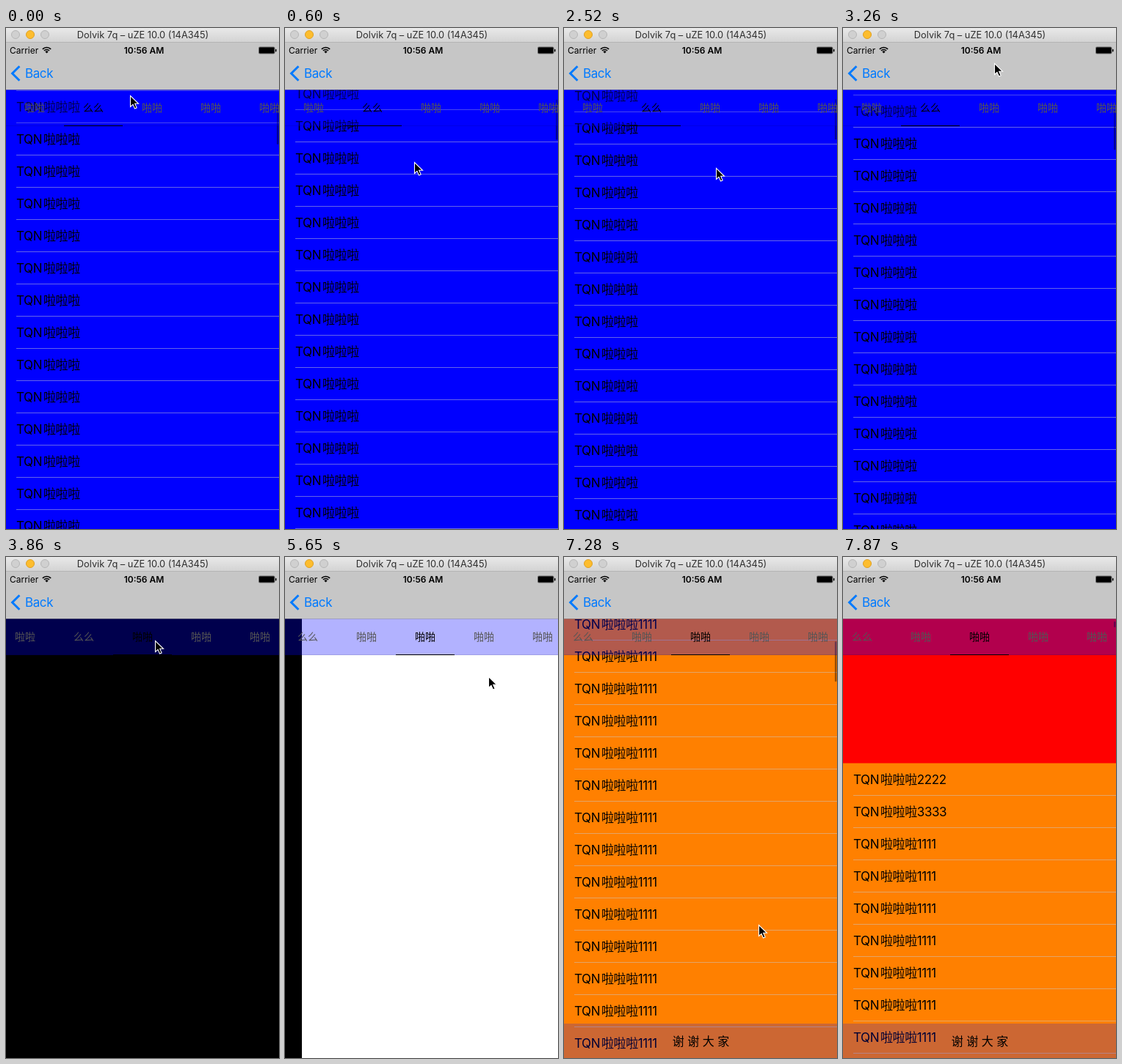
An HTML page with a canvas for the animation above (8000 ms loop, 372 px wide and 684 px high).

```html
<!DOCTYPE html>
<html lang="zh">
<head>
<meta charset="utf-8">
<title>Paged lists</title>
<style>
html, body { margin: 0; width: 372px; height: 684px; overflow: hidden; background: #000; }
canvas { display: block; }
</style>
</head>
<body>
<canvas id="stage" width="372" height="684"></canvas>
<script>
const ctx = document.getElementById('stage').getContext('2d');
const W = 372, H = 684, LOOP = 8000, STEP = 148.6;
const TOP = 84, BAR = 50, ROW = 44;
const FONT = 'Inter, "Noto Sans CJK SC", "Noto Sans CJK JP", "Noto Sans CJK", sans-serif';
const TABS = ['啦啦', '么么', '啪啪', '啪啪', '啪啪', '啪啪'];

// Tracks: [step, value...]
const POINTER = [
  [0, 169, 92], [9, 185, 310], [17, 207, 191], [20, 207, 36], [24, 203, 114],
  [26, 203, 114], [31, 165, 272], [35, 240, 108], [36, 240, 108], [38, 277, 163],
  [39.5, 275, 300], [42, 272, 34], [44, 268, 220], [53, 262, 704]
];
const PAGE = [[0, 1], [24, 1], [26, 2], [36, 2], [38, 2.938], [39, 3]];
const BLUE = [[0, 175], [9, 7], [17, 102], [20, 256], [24, 262]];
const ORANGE = [[39, 0], [40, 0], [42, 330], [44, 629], [45, 640], [53, -47]];
const LOADED = 39;

function at(track, n) {
  if (n <= track[0][0]) return track[0].slice(1);
  for (let i = 1; i < track.length; i++) {
    const a = track[i - 1], b = track[i];
    if (n <= b[0]) {
      const u = (n - a[0]) / (b[0] - a[0]), e = u * u * (3 - 2 * u);
      return a.slice(1).map((v, k) => v + (b[k + 1] - v) * e);
    }
  }
  return track[track.length - 1].slice(1);
}

function rect(x, y, w, h, color) {
  ctx.fillStyle = color;
  ctx.fillRect(x, y, w, h);
}

function text(str, x, y, size, color = '#000', { weight = 400, align = 'left', track = 0 } = {}) {
  ctx.font = `${weight} ${size}px ${FONT}`;
  ctx.letterSpacing = track + 'px';
  ctx.textAlign = align;
  ctx.fillStyle = color;
  ctx.fillText(str, x, y);
}

function pill(x, y, w, h, r, color) {
  ctx.fillStyle = color;
  ctx.beginPath();
  ctx.roundRect(x, y, w, h, r);
  ctx.fill();
}

function indicator(x, scroll) {
  const len = Math.max(7, 55 + Math.min(0, scroll));
  pill(x + 369, TOP + 4 + Math.max(0, scroll) * 0.0917, 2.5, len, 1.2, 'rgba(0,0,0,.4)');
}

function rows(x, first, line, suffix) {
  const from = Math.max(0, Math.floor((TOP - first) / ROW) - 1);
  for (let i = from; first + i * ROW < H; i++) {
    const y = first + i * ROW;
    rect(x + 14, y + ROW, W - 14, 1, line);
    text('TQN', x + 14, y + 29, 17, '#000', { track: -0.4 });
    text('啦啦啦' + suffix(i), x + 51, y + 29, 17, '#000', { track: -0.4 });
  }
}

function bluePage(x, n) {
  const scroll = Math.round(at(BLUE, n)[0]);
  rect(x, TOP, W, H - TOP, '#00f');
  rows(x, TOP - scroll, '#6464e8', () => '');
  indicator(x, scroll);
}

function orangePage(x, n) {
  if (n < LOADED) return rect(x, TOP, W, H - TOP, '#fff');
  const scroll = Math.round(at(ORANGE, n)[0]);
  const first = TOP + 150 - scroll;
  rect(x, TOP, W, H - TOP, '#ff8000');
  if (first > TOP) rect(x, TOP, W, first - TOP + 0.5, '#f00');
  rows(x, first, '#e4a466', i => ['2222', '3333'][i] || '1111');
  indicator(x, scroll);
  rect(x, 637, W, 47, 'rgba(0,0,255,.2)');
  text('谢 谢 大 家', x + 186.5, 667, 16, '#000', { align: 'center' });
}

function pages(p, n) {
  ctx.save();
  ctx.beginPath();
  ctx.rect(0, TOP, W, H - TOP);
  ctx.clip();
  rect(0, TOP, W, H - TOP, '#000');
  const left = i => Math.round((i - p) * W);
  if (p < 2) bluePage(left(1), n);
  if (p > 2) orangePage(left(3), n);
  ctx.restore();
}

function tabBar(p) {
  const off = Math.max(0, 80 * p - 147), chosen = Math.ceil(p - 0.05);
  rect(0, TOP, W, BAR, 'rgba(0,0,255,.3)');
  rect(0, TOP + BAR - 1, W, 1, 'rgba(0,0,0,.1)');
  TABS.forEach((name, i) => {
    const x = Math.round(25 + 80 * i - off);
    text(name, x, 114, 14, i === chosen ? '#000' : '#555');
    if (i === chosen) rect(x - 26, 133, 80, 1, '#000');
  });
}

function disc(x, fill, edge) {
  ctx.beginPath();
  ctx.arc(x, 9, 5.5, 0, 7);
  ctx.fillStyle = fill;
  ctx.fill();
  ctx.strokeStyle = edge;
  ctx.lineWidth = 1;
  ctx.stroke();
}

function windowBar() {
  const g = ctx.createLinearGradient(0, 0, 0, 19);
  g.addColorStop(0, '#e9e9e9');
  g.addColorStop(1, '#d3d3d3');
  rect(0, 0, W, 19, g);
  rect(0, 19, W, 1, '#b4b4b4');
  disc(13, '#d0d0d0', '#b6b6b6');
  disc(33, '#fdbd2e', '#dfa023');
  disc(53, '#d0d0d0', '#b6b6b6');
  text('Dolvik 7q – uZE 10.0 (14A345)', 186.5, 14, 12.8, '#2e2e2e', { align: 'center' });
}

function wifi() {
  const a = -Math.PI * 0.75, b = -Math.PI * 0.25;
  ctx.strokeStyle = ctx.fillStyle = '#000';
  ctx.lineWidth = 1.7;
  for (const r of [8, 5]) {
    ctx.beginPath();
    ctx.arc(55.5, 34.5, r, a, b);
    ctx.stroke();
  }
  ctx.beginPath();
  ctx.moveTo(55.5, 34.5);
  ctx.arc(55.5, 34.5, 3, a, b);
  ctx.fill();
}

function navBar() {
  rect(0, 20, W, 64, '#c6c6c6');
  rect(0, TOP, W, 1, 'rgba(139,139,139,.5)');
  text('Carrier', 5, 34.5, 12);
  wifi();
  text('10:56 AM', 188, 34.5, 12, '#000', { weight: 600, align: 'center' });
  pill(344, 25.5, 22.5, 10, 2, 'rgba(0,0,0,.45)');
  pill(345, 26.5, 20.5, 8, 1, '#000');
  pill(367, 28.8, 1.5, 3.6, 0.7, '#000');
  ctx.strokeStyle = '#007aff';
  ctx.lineWidth = 3;
  ctx.beginPath();
  ctx.moveTo(18.4, 52.2);
  ctx.lineTo(8.6, 62);
  ctx.lineTo(18.4, 71.8);
  ctx.stroke();
  text('Back', 26, 68, 17, '#007aff', { track: -0.4 });
}

function pointer(x, y) {
  const shape = [[0, 0], [0, 15], [3.5, 11.8], [6, 17.5], [8.6, 16.4], [6.2, 10.8], [11, 10.8]];
  ctx.save();
  ctx.translate(Math.round(x) + 0.5, Math.round(y) + 0.5);
  ctx.beginPath();
  shape.forEach(([a, b]) => ctx.lineTo(a, b));
  ctx.closePath();
  ctx.fillStyle = '#000';
  ctx.fill();
  ctx.strokeStyle = '#fff';
  ctx.lineWidth = 1.1;
  ctx.stroke();
  ctx.restore();
}

function draw(t) {
  const n = Math.min(53, Math.floor((t + 8) / STEP));
  const [p] = at(PAGE, n);
  pages(p, n);
  tabBar(p);
  navBar();
  windowBar();
  pointer(...at(POINTER, n));
}

const start = performance.now();
function tick() {
  draw((performance.now() - start) % LOOP);
  requestAnimationFrame(tick);
}
tick();
</script>
</body>
</html>
```
